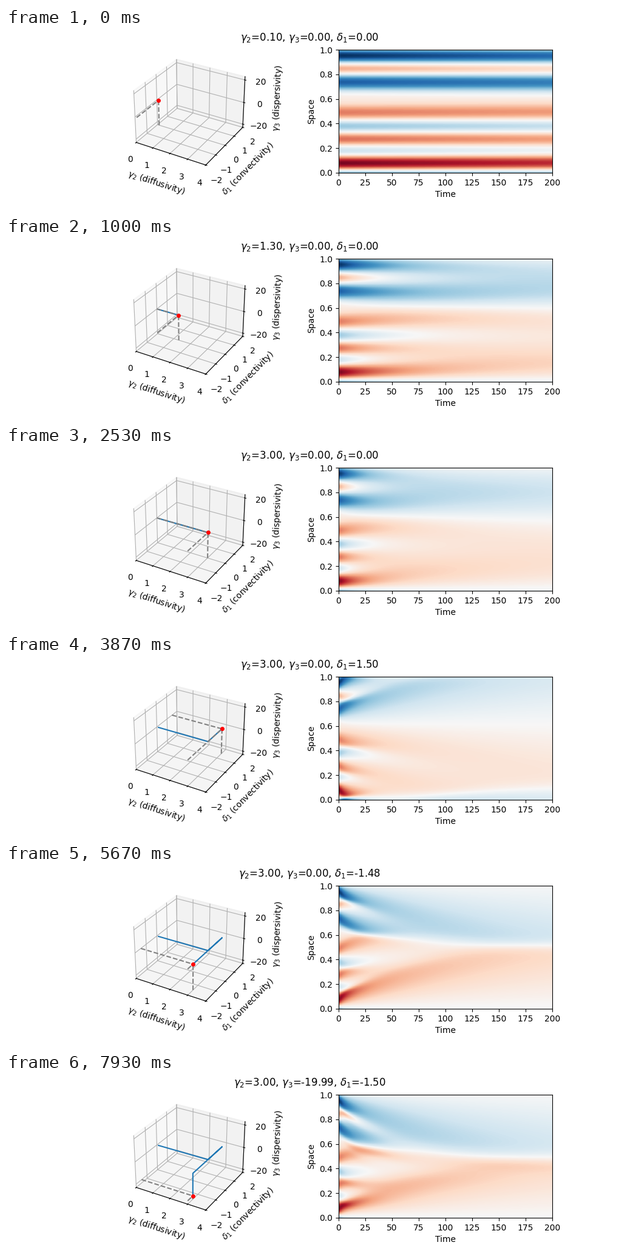
A matplotlib script that plays this animation: 1000x300 px, repeating every 8 s.

```python
import numpy as np
import matplotlib.pyplot as plt
from matplotlib.animation import FuncAnimation

LOOP_MS = 8000
FRAMES = 160     # drawn frames per loop
POSES = 120      # parameter steps per loop
N = 160          # grid points in space
STEPS = 200      # time steps per simulation
X_MIN, Y_MIN, Z_MIN = 0, -2, -23


def parameter_path():
    """Rows of (gamma_2, delta_1, gamma_3), eased between the corner points."""
    corners = np.array([(0.1, 0, 0), (3, 0, 0), (3, 1.5, 0),
                        (3, -1.5, 0), (3, -1.5, -20)])
    ease = np.append(0, 1 / (1 + np.exp(-np.linspace(-10, 10, 30))))[:, None]
    legs = [a + (b - a) * ease for a, b in zip(corners, corners[1:])]
    return np.concatenate(legs)[:POSES]


def initial_state():
    """Five-harmonic Fourier series fitted to its crests and troughs."""
    peaks = np.array([
        (0.078, 0.97), (0.184, -0.2), (0.275, 0.58), (0.377, -0.37),
        (0.49, 0.54), (0.61, 0.09), (0.738, -0.84), (0.847, 0.37),
        (0.953, -1)])
    x, height = peaks.T
    freq = 2 * np.pi * np.arange(1, 6)

    def basis(x):
        phase = np.outer(x, freq)
        return np.hstack([np.cos(phase), np.sin(phase)])

    def slope(x):
        phase = np.outer(x, freq)
        return np.hstack([-freq * np.sin(phase), freq * np.cos(phase)])

    rows = np.vstack([basis(x), 0.02 * slope(x)])
    goal = np.append(height, np.zeros_like(height))
    coef = np.linalg.lstsq(rows, goal, rcond=None)[0]
    u = basis(np.arange(N) / N) @ coef
    return u / np.abs(u).max()


def simulate(params):
    """Solve u_t = b/2 (u^2)_x + a2 u_xx + a3 u_xxx for all rows at once."""
    g2, d1, g3 = (p[:, None] for p in params.T)
    k = np.arange(N // 2 + 1)
    deriv = 2j * np.pi * k
    keep = k < N / 3
    lin = g2 / (2 * N**2) * deriv**2 + g3 / (4 * N**3) * deriv**3
    lin[:, 0] = -1   # the mean stays zero
    grow = np.exp(lin)
    phi1 = (grow - 1) / lin
    phi2 = (grow - 1 - lin) / lin**2

    def convect(v):
        square = np.fft.irfft(v * keep, N) ** 2
        return d1 / (2 * N) * deriv * keep * np.fft.rfft(square)

    v = np.tile(np.fft.rfft(initial_state()), (len(params), 1))
    history = [v]
    for _ in range(STEPS):
        force = convect(v)
        guess = grow * v + phi1 * force
        v = guess + phi2 * (convect(guess) - force)
        history.append(v)
    u = np.fft.irfft(np.array(history), N)
    u = np.concatenate([u, u[..., :1]], axis=-1)   # periodic wrap
    return u.transpose(1, 2, 0)


path = parameter_path()
fields = simulate(path)

fig = plt.figure(figsize=(10, 3), dpi=100)
space = fig.add_subplot(1, 2, 1, projection="3d")
heat = fig.add_subplot(1, 2, 2)
fig.subplots_adjust(bottom=0.2)
title = fig.suptitle("")

space.set_xlim(X_MIN, 4)
space.set_ylim(Y_MIN, 2)
space.set_zlim(Z_MIN, -Z_MIN)
space.set_xlabel(r"$\gamma_2$ (diffusivity)")
space.set_ylabel(r"$\delta_1$ (convectivity)")
space.set_zlabel(r"$\gamma_3$ (dispersivity)")

trail, = space.plot([], [], [], color="C0")
guides = [space.plot([], [], [], "--", color="gray")[0] for _ in range(3)]
dot, = space.plot([], [], [], "o", color="red", markersize=4)

image = heat.imshow(fields[0], cmap="RdBu_r", vmin=-1, vmax=1, origin="lower",
                    aspect="auto", extent=(0, STEPS, 0, 1))
heat.set_xlabel("Time")
heat.set_ylabel("Space")


def update(frame):
    # Parameters step at 15 per second; each frame shows the pose near its end.
    n = int((frame + 0.88) * POSES / FRAMES)
    x, y, z = path[n]
    title.set_text(rf"$\gamma_2$={x:.2f}, $\gamma_3$={z:.2f}, $\delta_1$={y:.2f}")
    trail.set_data_3d(*path[:n + 1].T)
    dot.set_data_3d([x], [y], [z])
    guides[0].set_data_3d([X_MIN, x], [y, y], [z, z])
    guides[1].set_data_3d([x, x], [Y_MIN, y], [z, z])
    guides[2].set_data_3d([x, x], [y, y], [Z_MIN, z])
    image.set_data(fields[n])
    return trail, dot, *guides, image, title


anim = FuncAnimation(fig, update, frames=FRAMES, interval=LOOP_MS / FRAMES,
                     init_func=lambda: update(0), repeat=True, repeat_delay=0)
plt.show()
```
